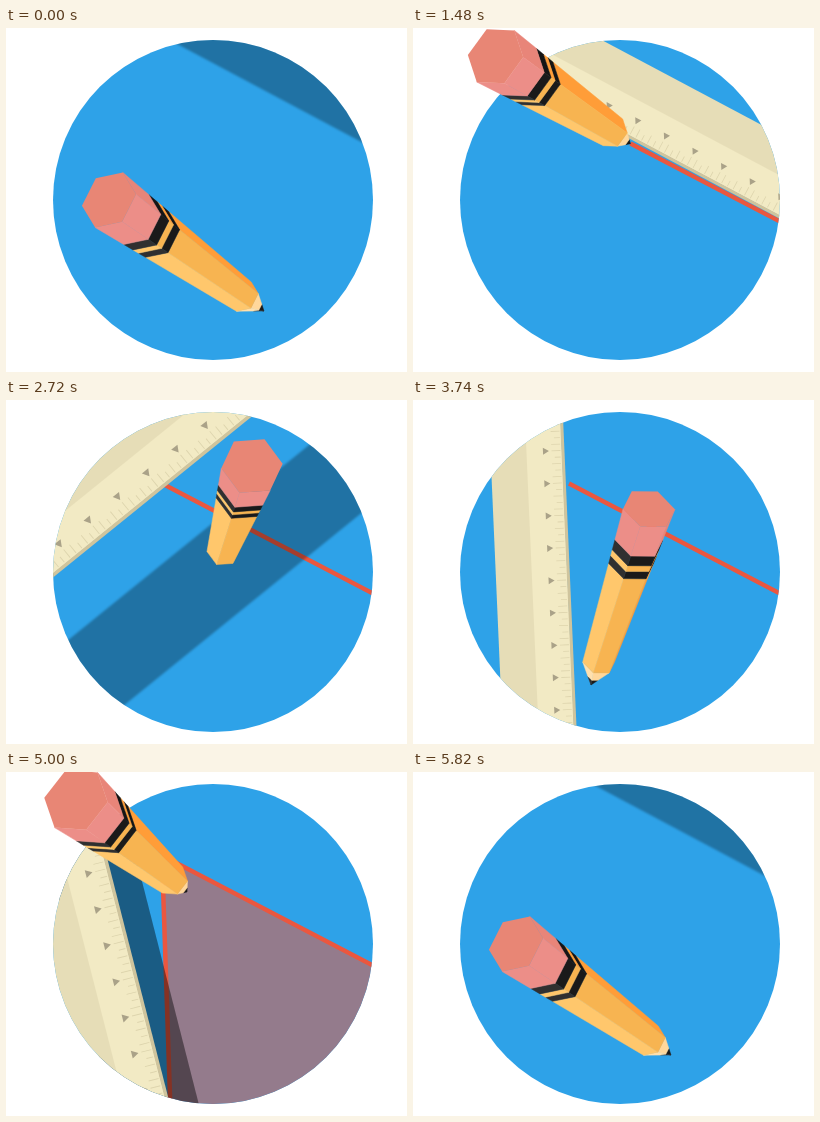
Recreate the animation shown at these times as an HTML page with a canvas. Size 401 by 344 pixels, loop 5860 ms.

```html
<!DOCTYPE html>
<html>
<head>
<meta charset="utf-8">
<title>Pencil and ruler</title>
<style>
html, body { margin: 0; width: 100%; height: 100%; overflow: hidden; background: #fff; }
canvas { display: block; }
</style>
</head>
<body>
<canvas id="stage" width="401" height="344"></canvas>
<script>
const ctx = document.getElementById('stage').getContext('2d');
const LOOP = 5860, TAU = Math.PI * 2, RAD = Math.PI / 180;
const APEX = { x: 160, y: 86 };

// [start time, number of 40 ms steps]
const runs = [[0, 1], [140, 4], [400, 12], [980, 1], [1120, 1], [1260, 3], [1480, 2],
  [1660, 7], [2040, 11], [2580, 1], [2720, 5], [3020, 3], [3240, 3], [3460, 1],
  [3600, 1], [3740, 6], [4080, 10], [4580, 1], [4720, 15], [5320, 7], [5700, 4]];

// step, normal angle, distance from apex, shadow offset, scale, slide
const rulerKeys = [
  [0, 118, -211, 144, 1.16, 5],
  [9, 118, -50, 48, 1.06, 5],
  [13, 118, -4.8, 0, 1, 4.8],
  [30, 118, -4.8, 0, 1, 4.8],
  [33, 112, -4.3, 14, 1.01, 12],
  [43, 51, 0, 144, 1.16, 5.8],
  [48, 16, -3, 80, 1.08, 0],
  [52, 0, -6, 18, 1.02, -3],
  [55, -2.5, -7, 0, 1, -3.6],
  [73, -2.5, -7, 0, 1, -3.6],
  [80, -14.3, -57, 28, 1.15, -3.7],
  [88, -18, -190, 40, 1.2, -3.7],
  [89, 118, -280, 146, 1.16, 5],
  [99, 118, -211, 144, 1.16, 5]
];

// step, eraser x y, tip x y
const pathKeys = [
  [0, 103, 172, 258, 283],
  [5, 97, 178, 251, 289],
  [13, 163, 57, 358, 188],
  [16, 133, 38, 313, 165],
  [21, 90, 28, 238, 126],
  [25, 67, 30, 165, 90],
  [30, 74, 32, 163, 94],
  [33, 134, 44, 181, 118],
  [43, 246, 66, 213, 163],
  [56, 236, 109, 178, 285],
  [61, 222, 155, 165, 320],
  [68, 115, 75, 163, 245],
  [72, 67, 57, 159, 125],
  [74, 60, 40, 157, 88],
  [80, 70, 28, 181, 120],
  [87, 85, 85, 215, 190],
  [95, 103, 172, 258, 283],
  [99, 103, 172, 258, 283]
];

// step, eraser radius, squash, roll
const tiltKeys = [
  [0, 31, .8, 19],
  [5, 31, .8, 19],
  [13, 25, .69, 38],
  [25, 34, .88, 33],
  [33, 36, .95, 38],
  [43, 31, .95, 6],
  [56, 27, .72, 6],
  [61, 26, .68, 6],
  [80, 35, .87, 28],
  [95, 31, .8, 19],
  [99, 31, .8, 19]
];

const fadeKeys = [[0, 0], [73, 0], [79, 1], [88, 1], [97, 0], [99, 0]];

// Smooth interpolation that never overshoots its keys
function sample(keys, i) {
  let k = 0;
  while (k < keys.length - 2 && keys[k + 1][0] <= i) k++;
  const a = keys[k], b = keys[k + 1], span = b[0] - a[0], u = (i - a[0]) / span;
  const slope = (j, c) => {
    const p = keys[j], q = keys[j + 1];
    return p && q ? (q[c] - p[c]) / (q[0] - p[0]) : null;
  };
  const tangent = (j, c) => {
    const l = slope(j - 1, c), r = slope(j, c);
    if (l === null) return r;
    if (r === null) return l;
    return l * r > 0 ? 2 * l * r / (l + r) : 0;
  };
  return a.slice(1).map((from, n) => {
    const c = n + 1, u2 = u * u, u3 = u2 * u;
    return from * (2 * u3 - 3 * u2 + 1) + b[c] * (3 * u2 - 2 * u3) +
      span * (tangent(k, c) * (u3 - 2 * u2 + u) + tangent(k + 1, c) * (u3 - u2));
  });
}

function stepAt(t) {
  let base = 0, step = 0;
  for (const [start, count] of runs) {
    if (t < start) break;
    step = base + Math.min(count - 1, Math.floor((t - start) / 40));
    base += count;
  }
  return step;
}

function poly(points, color, seam) {
  ctx.beginPath();
  points.forEach(p => ctx.lineTo(p[0], p[1]));
  ctx.closePath();
  ctx.fillStyle = color;
  ctx.fill();
  if (seam) {
    ctx.strokeStyle = color;
    ctx.lineWidth = .5;
    ctx.stroke();
  }
}

function strip(color, y, h) {
  ctx.fillStyle = color;
  ctx.fillRect(-450, y, 900, h);
}

function line(x1, y1, x2, y2) {
  ctx.beginPath();
  ctx.moveTo(x1, y1);
  ctx.lineTo(x2, y2);
  ctx.strokeStyle = '#ea573f';
  ctx.lineWidth = 4.5;
  ctx.stroke();
}

function drawLines(i, tipX, tipY) {
  const fade = sample(fadeKeys, i)[0];
  if (fade > 0) {
    ctx.globalAlpha = fade;
    poly([[156, 84], [366, 193], [420, 420], [167, 420]], '#947b8c');
  }
  ctx.globalAlpha = i > 88 ? fade : 1;
  if (i >= 13 && i < 97) {
    const x = i < 28 ? Math.max(156, tipX) : 156;
    line(x, 83.5 + (x - 156) * .521, 370, 195);
  }
  if (i > 60 && i < 97) {
    const y = i < 74 ? Math.max(84, tipY) : 84;
    line(156 + (y - 84) * .033, y, 164.5, 340);
  }
  ctx.globalAlpha = 1;
}

function drawRuler(i) {
  const [angle, dist, lift, s, slide] = sample(rulerKeys, i);
  const nx = Math.cos(angle * RAD), ny = Math.sin(angle * RAD);
  const place = d => {
    ctx.save();
    ctx.transform(-ny * s, nx * s, nx * s, ny * s, APEX.x + nx * d, APEX.y + ny * d);
  };
  if (lift > .5) {
    place(dist + lift);
    if (lift > 40) ctx.filter = 'blur(1px)';
    strip(`rgba(0,0,0,${.465 - .0012 * lift})`, -74, 74);
    ctx.restore();
  }
  place(dist);
  strip('#e6ddb7', -74, 37);
  strip('#f2eac4', -38, 35.5);
  strip('#cfc49d', -3, 3);
  for (let k = -13; k <= 13; k++) {
    const x = slide + k * 32.4;
    poly([[x - 3.5, -21.5], [x + 3.5, -21.5], [x, -15.5]], '#aaa288');
    ctx.fillStyle = '#ded5ae';
    for (let m = 0; m < 5; m++) {
      const len = m % 2 ? 6 : 9;
      ctx.fillRect(x + m * 6.48 - .4, -4 - len, .8, len);
    }
  }
  ctx.restore();
}

const INK = ['#151515', '#1a1a1a', '#303030'];
const PAINT = ['#ff9d38', '#f7b451', '#ffc76c'];

// Start, end, colours for the upper, middle and lower faces; far end first
const sections = [
  [.95, 1, INK],
  [.87, .95, ['#ffd08a', '#ffd79b', '#ffe0ae']],
  [.31, .87, PAINT],
  [.267, .31, INK],
  [.233, .267, PAINT],
  [.176, .233, INK],
  [0, .176, ['#e88579', '#ec8e88', '#ec8e88']]
];

function drawPencil([ex, ey, tx, ty], [r0, squash, roll]) {
  const dx = tx - ex, dy = ty - ey, len = Math.hypot(dx, dy);
  const ax = dx / len, ay = dy / len;
  const radius = p => p < .87 ? r0 + (16.5 - r0) * p / .87 : 16.5 * (1 - p) / .13;
  const corner = (k, p) => {
    const th = (roll + k * 60) * RAD, r = radius(p);
    const u = Math.cos(th) * squash * r, v = Math.sin(th) * r;
    return [ex + dx * p + ax * u - ay * v, ey + dy * p + ay * u + ax * v];
  };
  const area = q => q.reduce((sum, p, n) => {
    const w = q[(n + 1) % q.length];
    return sum + p[0] * w[1] - w[0] * p[1];
  }, 0);
  for (const [p0, p1, colors] of sections) {
    for (let k = -3; k < 3; k++) {
      const quad = [corner(k, p0), corner(k + 1, p0), corner(k + 1, p1), corner(k, p1)];
      const tone = Math.max(0, Math.min(2, k + 2));
      if (area(quad) < 0) poly(quad, colors[tone], true);
    }
  }
  poly([0, 1, 2, 3, 4, 5].map(k => corner(k, 0)), '#e88675');
}

function draw(now) {
  const i = stepAt(now % LOOP), path = sample(pathKeys, i);
  ctx.fillStyle = '#fff';
  ctx.fillRect(0, 0, 401, 344);
  ctx.save();
  ctx.beginPath();
  ctx.arc(207, 172, 160, 0, TAU);
  ctx.fillStyle = '#2ea2e8';
  ctx.fill();
  ctx.clip();
  drawLines(i, path[2], path[3]);
  drawRuler(i);
  ctx.restore();
  drawPencil(path, sample(tiltKeys, i));
}

const origin = performance.now();
function tick() {
  draw(performance.now() - origin);
  requestAnimationFrame(tick);
}
tick();
</script>
</body>
</html>
```
